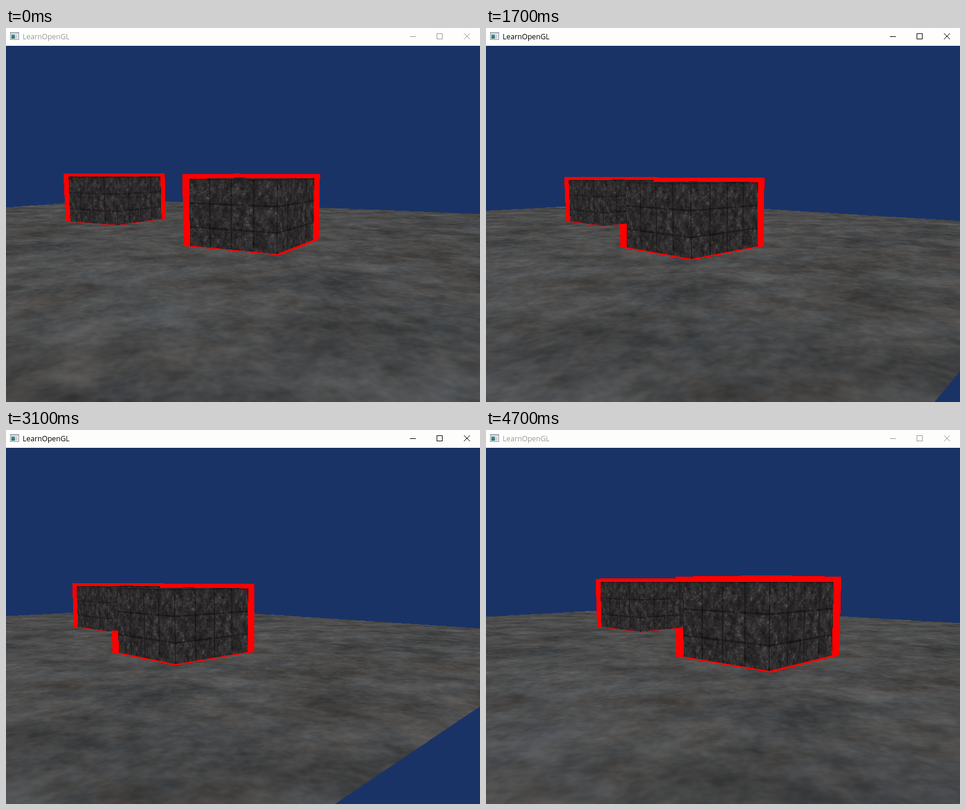
Animation, 798 px wide and 630 px high, one loop 4800 ms. Source, as an HTML page with a canvas:

```html
<!DOCTYPE html>
<html lang="en">
<head>
<meta charset="utf-8">
<title>LearnOpenGL</title>
<style>
html, body { margin: 0; width: 100%; height: 100%; overflow: hidden; background: #1a3366; }
#bar { position: absolute; left: 0; top: 0; display: block; background: #fdfdfb; color: #999; }
#bar.active { color: #000; }
#bar text { font: 12.2px "Open Sans", "Noto Sans", sans-serif; fill: currentColor; }
#view { position: absolute; left: 0; top: 30px; display: block; }
</style>
</head>
<body>
<svg id="bar" width="798" height="30" viewBox="0 0 798 30">
  <defs>
    <linearGradient id="pane" x2="0" y2="1">
      <stop stop-color="#4a8f96"/><stop offset="1" stop-color="#2f6f62"/>
    </linearGradient>
  </defs>
  <g shape-rendering="crispEdges">
    <rect x="7" y="7" width="15" height="13" fill="#8d939c"/>
    <rect x="8" y="8" width="13" height="2" fill="#c3ccd8"/>
    <rect x="8" y="10" width="13" height="9" fill="#f4f5f6"/>
    <rect x="9" y="11" width="6" height="7" fill="url(#pane)"/>
    <rect x="16" y="11" width="2" height="7" fill="#b9c2cc"/>
    <rect x="19" y="11" width="1" height="7" fill="#cdd3da"/>
  </g>
  <text x="28" y="19">LearnOpenGL</text>
  <g fill="none" stroke="currentColor">
    <path d="M680 14.5h10M725.5 9.5h9v9h-9z" shape-rendering="crispEdges"/>
    <path d="M771 9l10 10M781 9l-10 10"/>
  </g>
</svg>
<canvas id="view" width="798" height="600"></canvas>
<script>
const W = 798, H = 600, LOOP = 4800, STEP = 100;
const FOCAL = 300 / Math.tan(22 * Math.PI / 180);
const FLOOR = -0.2, HALF_FLOOR = 5;
const CUBES = [[2, 0], [-1, -1]];
const SKY_ROWS = 190;

// time, x, eye height, z, yaw, pitch
const KEYS = [
  [600, 4.179, 0.568, 4.261, 28.55, 6.68],
  [900, 4.296, 0.568, 4.199, 32.35, 6.66],
  [1250, 4.34, 0.468, 3.09, 37, 6.3],
  [1700, 5.42, 0.565, 3.305, 42, 6.19],
  [2300, 5.29, 0.5, 2.35, 43.5, 6],
  [2600, 5.366, 0.485, 2.087, 44.45, 5.92],
  [2700, 5.3, 0.477, 2.02, 44.3, 5.9],
  [3100, 5.775, 0.565, 3.025, 43.55, 5.65],
  [3600, 5.172, 0.54, 3.13, 43.9, 5.77],
  [4100, 4.556, 0.5, 3.275, 42.6, 5.69]
];

function cameraAt(t) {
  let i = 0;
  while (i < KEYS.length - 2 && t > KEYS[i + 1][0]) i++;
  const a = KEYS[i], b = KEYS[i + 1];
  const k = Math.min(1, Math.max(0, (t - a[0]) / (b[0] - a[0])));
  const [, x, y, z, yaw, pitch] = a.map((v, j) => v + (b[j] - v) * k);
  return { x, y, z, yaw: yaw * Math.PI / 180, pitch: pitch * Math.PI / 180 };
}

function random(seed) {
  return () => {
    seed = (seed + 0x6D2B79F5) | 0;
    let r = Math.imul(seed ^ (seed >>> 15), 1 | seed);
    r = (r + Math.imul(r ^ (r >>> 7), 61 | r)) ^ r;
    return ((r ^ (r >>> 14)) >>> 0) / 4294967296;
  };
}

// Tileable fractal noise with mean 0 and deviation 1
function noise(size, cells, gain, seed) {
  const out = new Float32Array(size * size), rnd = random(seed);
  let amp = 1;
  for (let n = cells; n <= size / 2; n *= 2, amp *= gain) {
    const grid = Float32Array.from({ length: n * n }, rnd);
    const ease = f => f * f * (3 - 2 * f);
    for (let y = 0; y < size; y++) {
      const gy = y * n / size, y0 = gy | 0, fy = ease(gy - y0);
      const r0 = y0 * n, r1 = (y0 + 1) % n * n;
      for (let x = 0; x < size; x++) {
        const gx = x * n / size, x0 = gx | 0, x1 = (x0 + 1) % n, fx = ease(gx - x0);
        const top = grid[r0 + x0] + (grid[r0 + x1] - grid[r0 + x0]) * fx;
        const low = grid[r1 + x0] + (grid[r1 + x1] - grid[r1 + x0]) * fx;
        out[y * size + x] += amp * (top + (low - top) * fy);
      }
    }
  }
  let sum = 0, sq = 0;
  for (const v of out) { sum += v; sq += v * v; }
  const mean = sum / out.length, dev = Math.sqrt(sq / out.length - mean * mean);
  return out.map(v => (v - mean) / dev);
}

function mipmaps(data, n) {
  const levels = [{ n, data }];
  while (n > 8) {
    const src = data, m = n, h = n / 2;
    data = new Float32Array(h * h);
    for (let y = 0; y < h; y++) for (let x = 0; x < h; x++) {
      const i = 2 * y * m + 2 * x;
      data[y * h + x] = (src[i] + src[i + 1] + src[i + m] + src[i + m + 1]) / 4;
    }
    n = h;
    levels.push({ n, data });
  }
  return levels;
}

function bilinear({ n, data }, u, v) {
  const x = u * n - 0.5, y = v * n - 0.5, m = n - 1;
  const xf = Math.floor(x), yf = Math.floor(y), fx = x - xf, fy = y - yf;
  const x0 = xf & m, x1 = (xf + 1) & m, r0 = (yf & m) * n, r1 = ((yf + 1) & m) * n;
  const top = data[r0 + x0] + (data[r0 + x1] - data[r0 + x0]) * fx;
  const low = data[r1 + x0] + (data[r1 + x1] - data[r1 + x0]) * fx;
  return top + (low - top) * fy;
}

function sample(levels, u, v, lod) {
  lod = Math.max(0, Math.min(levels.length - 1.01, lod));
  const l = lod | 0, a = bilinear(levels[l], u, v);
  return lod === l ? a : a + (bilinear(levels[l + 1], u, v) - a) * (lod - l);
}

const stone = mipmaps(noise(512, 8, 0.86, 11), 512);

function makeMarble(n) {
  const veins = noise(n, 16, 0.75, 5), patches = noise(n, 16, 0.8, 23), grain = noise(n, 32, 0.85, 41);
  const groove = i => {
    const f = ((i + 0.5) / n * 4) % 1;
    return Math.min(f, 1 - f) < 0.025 ? 0.66 : 1;
  };
  return veins.map((v, i) => {
    const ridge = Math.exp(-v * v * 10) * Math.max(0, 0.5 + 0.6 * patches[i]);
    const lum = 42 + 4 * patches[i] + 4 * grain[i] + 24 * ridge;
    return lum * groove(i % n) * groove((i / n) | 0);
  });
}
const marble = mipmaps(makeMarble(256), 256);

const view = document.getElementById("view"), bar = document.getElementById("bar");
const ctx = view.getContext("2d");
const image = ctx.createImageData(W, H);
const pixels = new Uint32Array(image.data.buffer);
const rgb = (r, g, b) => (0xff000000 | (b << 16) | (g << 8) | r) >>> 0;
const SKY = rgb(26, 51, 102), RED = rgb(255, 0, 0);

// Distance along the ray to a box, or Infinity; the entered axis is kept in hitAxis
let hitAxis = 0;
function hitBox(ox, oy, oz, dx, dy, dz, half) {
  const sx = half / Math.abs(dx), sy = half / Math.abs(dy), sz = half / Math.abs(dz);
  const mx = -ox / dx, my = -oy / dy, mz = -oz / dz;
  const ax = mx - sx, ay = my - sy, az = mz - sz;
  const near = Math.max(ax, ay, az);
  const far = Math.min(mx + sx, my + sy, mz + sz);
  if (near > far || near <= 0) return Infinity;
  hitAxis = near === ax ? 0 : near === ay ? 1 : 2;
  return near;
}

function marbleColor(x, y, z, axis, t, slope) {
  const u = axis === 0 ? 0.5 - z : x + 0.5;
  const v = axis === 1 ? z + 0.5 : 0.5 - y;
  const lod = Math.log2(256 * t / FOCAL) - 0.4 * Math.log2(slope) - 0.3;
  const g = sample(marble, u, v, lod);
  return rgb(g + 1, g - 1, g);
}

function floorColor(x, z, t, slope) {
  const u = x / 5, v = z / 5;
  const lod = Math.log2(102.4 * t / FOCAL) - 0.35 * Math.log2(slope);
  const g = 76 + 7 * sample(stone, u, v, lod);
  const tint = 1.2 * bilinear(stone[1], v + 0.37, u + 0.61);
  return rgb(g + tint, g, g - tint);
}

function render(cam) {
  const sy = Math.sin(cam.yaw), cy = Math.cos(cam.yaw);
  const sp = Math.sin(cam.pitch), cp = Math.cos(cam.pitch);
  const drop = cam.y - FLOOR;
  pixels.fill(SKY, 0, SKY_ROWS * W);
  for (let row = SKY_ROWS; row < H; row++) {
    const b = (H / 2 - row - 0.5) / FOCAL;
    const ahead = cp + b * sp, dy = b * cp - sp;
    const tPlane = dy < 0 ? -drop / dy : Infinity;
    for (let col = 0; col < W; col++) {
      const a = (col + 0.5 - W / 2) / FOCAL;
      const dx = a * cy - ahead * sy, dz = -a * sy - ahead * cy;
      const fx = cam.x + dx * tPlane, fz = cam.z + dz * tPlane;
      const onFloor = Math.abs(fx) <= HALF_FLOOR && Math.abs(fz) <= HALF_FLOOR;
      const limit = onFloor ? tPlane : Infinity;

      let best = limit, cube = null, axis = 0, outlined = false;
      for (const c of CUBES) {
        const ox = cam.x - c[0], oz = cam.z - c[1];
        const shell = hitBox(ox, cam.y, oz, dx, dy, dz, 0.55);
        if (shell >= limit) continue;
        outlined = true;
        const t = hitBox(ox, cam.y, oz, dx, dy, dz, 0.5);
        if (t < best) { best = t; cube = c; axis = hitAxis; }
      }

      let color = SKY;
      if (cube) {
        const slope = Math.abs(axis === 0 ? dx : axis === 1 ? dy : dz);
        color = marbleColor(cam.x + dx * best - cube[0], cam.y + dy * best,
          cam.z + dz * best - cube[1], axis, best, slope);
      } else if (outlined) color = RED;
      else if (onFloor) color = floorColor(fx, fz, tPlane, -dy);
      pixels[row * W + col] = color;
    }
  }
  ctx.putImageData(image, 0, 0);
}

const start = performance.now();
let shown = -1;
function tick() {
  const t = (performance.now() - start) % LOOP;
  const time = Math.floor(t / STEP) * STEP;
  bar.classList.toggle("active", time >= 500 && time < 4700);
  const pose = Math.min(KEYS[KEYS.length - 1][0], Math.max(KEYS[0][0], time));
  if (pose !== shown) {
    shown = pose;
    render(cameraAt(pose));
  }
  requestAnimationFrame(tick);
}
tick();
</script>
</body>
</html>
```
